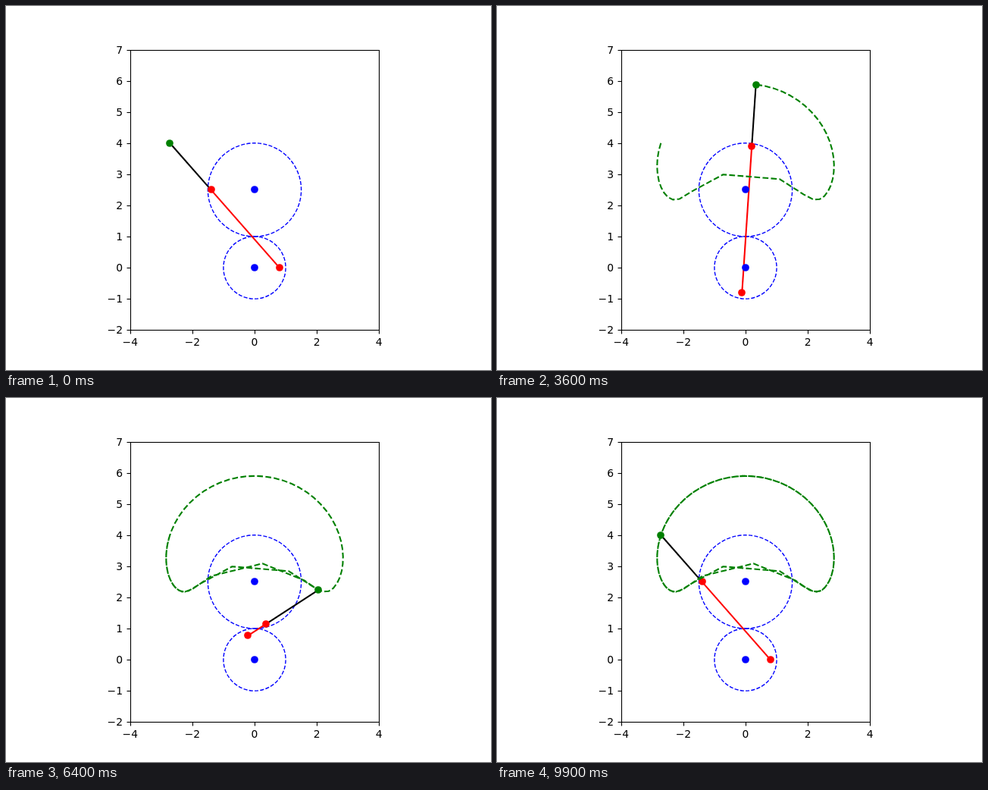
These frames come from a looping animation (640x480 px, 10000 ms). An HTML page with a canvas:

```html
<!DOCTYPE html>
<html lang="en">
<head>
<meta charset="utf-8">
<title>Linkage curve</title>
<style>
html, body { margin: 0; width: 100%; height: 100%; overflow: hidden; background: #fff; }
canvas { display: block; width: 640px; height: 480px; }
</style>
</head>
<body>
<canvas id="stage" width="640" height="480"></canvas>
<script>
const ctx = document.getElementById('stage').getContext('2d');
const STEPS = 100, STEP_MS = 100;
const UNIT = 369.6 / 9;   // pixels per data unit
const PT = 100 / 72;      // pixels per point
const GREEN = '#008000', RED = '#ff0000', BLUE = '#0000ff', BLACK = '#000000';

const px = x => 328 + x * UNIT;
const py = y => 427.2 - (y + 2) * UNIT;
const snap = v => Math.floor(v + 0.5);

// Two cranks turning together, half a turn apart; the rod runs on 2 units.
function pose(k) {
  const a = 4 * Math.PI * k / (STEPS - 1);
  const low = [0.8 * Math.cos(a), 0.8 * Math.sin(a)];
  const high = [-1.4 * Math.cos(a), 2.5 - 1.4 * Math.sin(a)];
  const dx = high[0] - low[0], dy = high[1] - low[1];
  const s = 2 / Math.hypot(dx, dy);
  return { low, high, tip: [high[0] + dx * s, high[1] + dy * s] };
}

const poses = Array.from({ length: STEPS }, (_, k) => pose(k));

function pen(color, pt, dashed) {
  const w = pt * PT;
  ctx.strokeStyle = color;
  ctx.lineWidth = w;
  ctx.lineJoin = 'round';
  ctx.setLineDash(dashed ? [3.7 * w, 1.6 * w] : []);
}

function polyline(points, color, dashed) {
  pen(color, 1.5, dashed);
  ctx.beginPath();
  points.forEach(([x, y]) => ctx.lineTo(px(x), py(y)));
  ctx.stroke();
}

function dot([x, y], color) {
  ctx.fillStyle = color;
  ctx.beginPath();
  ctx.arc(snap(px(x)), snap(py(y)), 3.5 * PT, 0, 2 * Math.PI);
  ctx.fill();
}

function ring(y, r) {
  pen(BLUE, 1, true);
  ctx.beginPath();
  ctx.arc(px(0), py(y), r * UNIT, Math.PI / 2, -1.5 * Math.PI, true);
  ctx.stroke();
}

function segment(x1, y1, x2, y2) {
  ctx.beginPath();
  ctx.moveTo(x1, y1);
  ctx.lineTo(x2, y2);
  ctx.stroke();
}

const label = v => String(v).replace('-', '\u2212');

function axes() {
  pen(BLACK, 0.8);
  ctx.fillStyle = BLACK;
  ctx.font = 10 * PT + 'px "DejaVu Sans", sans-serif';
  ctx.textBaseline = 'alphabetic';
  ctx.textAlign = 'center';
  for (let v = -4; v <= 4; v += 2) {
    const x = snap(px(v)) + 0.5;
    segment(x, 427.5, x, 432.5);
    ctx.fillText(label(v), px(v), 448);
  }
  ctx.textAlign = 'right';
  for (let v = -2; v <= 7; v++) {
    const y = snap(py(v)) + 0.5;
    segment(159.5, y, 164.5, y);
    ctx.fillText(label(v), 154, y + 4.5);
  }
  ctx.lineJoin = 'miter';
  ctx.strokeRect(164.5, 58.5, 328, 369);
}

function draw(k) {
  const { low, high, tip } = poses[k];
  ctx.fillStyle = '#ffffff';
  ctx.fillRect(0, 0, 640, 480);
  ring(0, 1);
  ring(2.5, 1.5);
  polyline([high, tip], BLACK);
  polyline([low, high], RED);
  dot(low, RED);
  dot(high, RED);
  polyline(poses.slice(0, k + 1).map(p => p.tip), GREEN, true);
  dot(tip, GREEN);
  dot([0, 0], BLUE);
  dot([0, 2.5], BLUE);
  axes();
}

const start = performance.now();
function tick() {
  const t = Math.max(0, performance.now() - start);
  draw(Math.floor(t / STEP_MS) % STEPS);
  requestAnimationFrame(tick);
}
tick();
</script>
</body>
</html>
```
